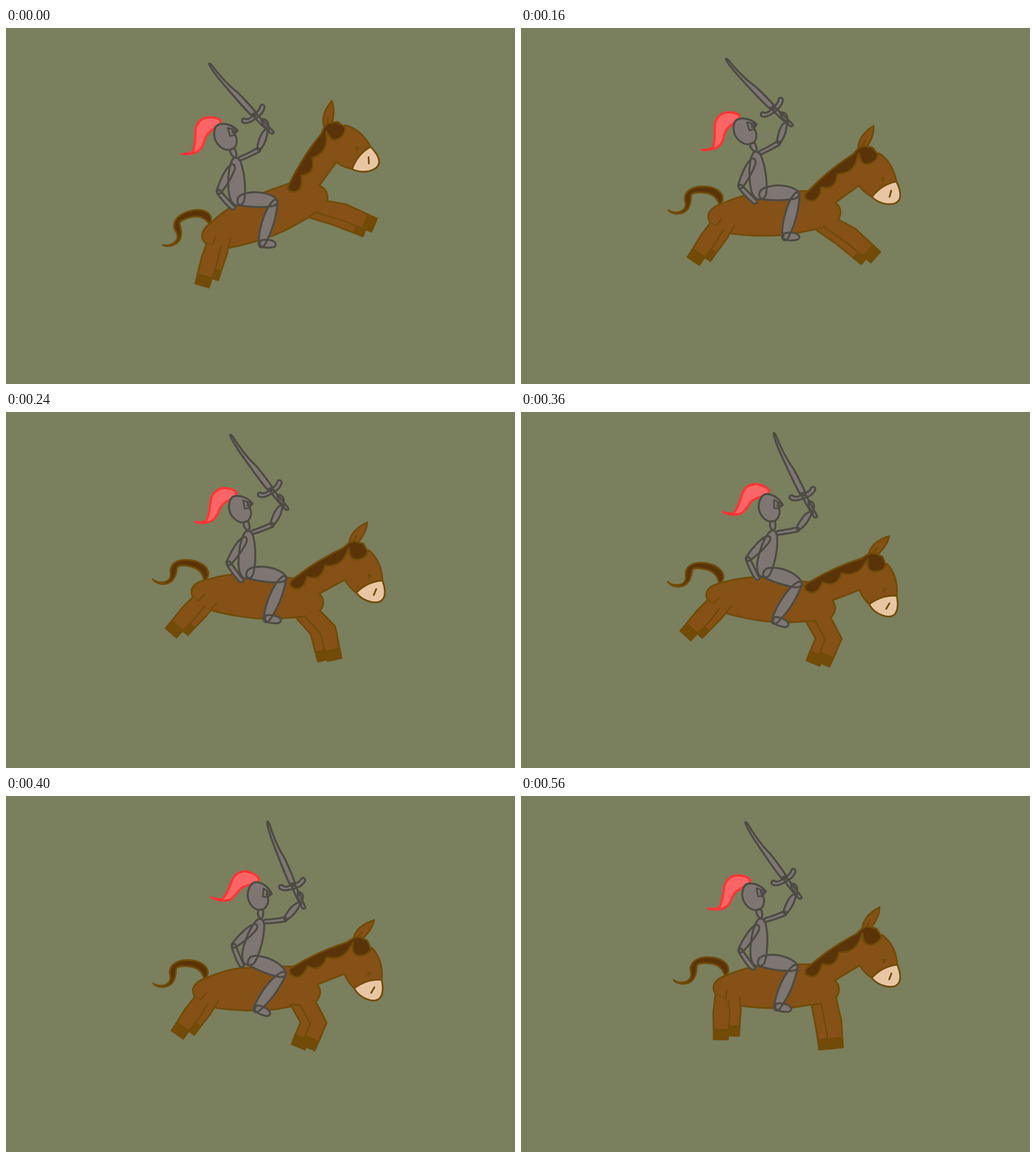
Write an HTML page that moves like this. It is 895 px wide and 626 px high and loops after 640 ms.

```html
<!DOCTYPE html>
<html lang="en">
<head>
<meta charset="utf-8">
<title>Knight on a galloping horse</title>
<style>
  html, body { margin: 0; width: 100%; height: 100%; overflow: hidden; background: #7a7f5e; }
  svg { display: block; width: 100%; height: 100%; }
  path { stroke-linecap: round; stroke-linejoin: round; }
  .horse { fill: #855117; stroke: #714b07; stroke-width: 3; }
  .skin { stroke: none; }
  .line { fill: none; }
  .hoof { fill: #714b07; }
  .hair { fill: #5a3408; }
  .nose { fill: #e9c6a3; }
  .armor { fill: #7e7672; stroke: #4d4b44; stroke-width: 3.5; }
  .plume { fill: #fc6565; stroke: #ff3636; stroke-width: 4; }
</style>
</head>
<body>
<svg viewBox="0 0 895 626">
  <g class="horse">
    <g id="rear">
      <path class="hair" d="M349 311C345 297 336 289 318 289C308 288 301 290 299 293C299 305 297 313 293 318C285 328 268 329 259 320C268 326 282 325 288 316C292 309 287 305 288 297C290 284 304 278 320 278C340 278 355 287 355 300Q354 307 349 311Z"/>
      <path d="M505 286C460 286 440 289 420 290C395 291 372 300 352 309C331 316 324 329 333 342L356 354L370 361C400 365 445 367 480 361L515 354"/>
      <g id="hindFar"></g>
      <g id="hindNear"></g>
    </g>
    <g id="front">
      <path d="M593 212C593 196 604 182 620 172C621 188 614 200 607 212"/>
      <path class="line" d="M600 209L605 197"/>
      <g id="foreFar"></g>
      <path class="skin" d="M499 294Q538 251 585 222L606 208L629 220C645 230 656 247 660 270L617 297L594 277L553 307C563 315 564 326 558 337L533 350L515 354L490 345Z"/>
      <g id="foreNear"></g>
      <path class="line" d="M629 220C645 230 656 247 660 270M617 297Q603 289 594 277L553 307C563 315 564 326 558 337M515 354L533 350M634 264Q638 261 638 265L635 269"/>
      <path class="nose" d="M617 297C628 283 643 273 660 270C667 284 669 294 665 302C658 314 632 312 617 297Z"/>
      <path class="line" d="M651 286L648 297"/>
      <path class="hair" d="M500 292Q538 251 584 222C592 212 598 206 606 208L618 210L628 223C625 236 611 242 602 238C596 234 596 227 594 220C590 230 590 256 556 257C555 272 548 285 528 280C526 296 519 308 505 303Q497 299 500 292Z"/>
    </g>
  </g>
  <g id="knight">
    <path class="plume" d="M377 166C379 160 368 157 358 157C343 157 333 168 333 184C333 199 332 210 328 218Q318 222 309 221Q320 223 329 220C347 216 346 203 352 190C357 181 367 177 374 172Q378 170 377 166Z"/>
    <defs>
      <path id="body" d="M357 63C359 61 364 68 370 76C380 88 392 102 407 113C418 124 430 137 439 148L431 153C420 143 405 125 392 110C378 94 360 72 357 63Z
        M449 162C455 158 462 164 461 172L462 180L452 170Z
        M460 178C452 178 446 190 442 208C440 216 446 217 449 212C456 202 460 190 460 178Z
        M412 226C420 223 432 217 442 211C448 210 449 217 443 219C433 224 422 230 412 233C408 232 408 228 412 226Z
        M436 156L441 152C452 163 462 173 470 182C472 186 467 187 464 184C455 176 446 168 436 156Z
        M419 159C413 160 414 167 419 167C426 168 432 164 438 160C446 155 452 150 454 142C457 135 448 132 447 138C446 144 442 148 436 153C430 158 424 163 419 159Z
        M394 214C400 210 404 213 404 217C407 224 405 228 401 227C396 224 394 220 394 214Z
        M377 169C387 167 400 172 407 180L402 187C408 195 407 210 397 213C385 219 366 205 366 186C366 175 370 170 377 169Z
        M399 230C404 225 412 230 414 240C420 258 422 285 419 303C416 313 408 313 402 311C393 305 391 290 391 275C390 255 394 238 399 230Z
        M396 240C403 238 404 246 401 252C395 266 386 280 378 290C372 294 369 289 371 284C376 268 386 246 396 240Z
        M376 285C383 293 393 304 401 313C405 316 402 320 397 319C388 313 378 300 372 292C370 287 373 284 376 285Z
        M407 305C406 297 413 292 425 290C445 286 470 292 477 303C480 310 470 314 462 314C445 316 425 314 412 312C408 310 407 308 407 305Z
        M470 303C477 300 479 305 477 312C474 340 464 365 455 381C450 389 444 386 444 378C445 352 455 318 470 303Z
        M447 374C453 371 467 372 472 376C477 380 474 386 466 386C458 387 450 385 446 382Z"/>
    </defs>
    <use href="#body" class="armor" style="stroke:none"/>
    <use href="#body" class="armor" style="fill:none"/>
    <path class="armor line" style="stroke-width:3" d="M390 176L394 190L402 188L397 178M391 176L407 180L398 184"/>
  </g>
</svg>
<script>
const $ = id => document.getElementById(id);
const LOOP = 640;

// Motion keys as time: value, joined by straight lines around the loop.
const MOTION = {
  pitch: { 0: -18, 80: -10, 160: 0, 320: 15, 400: 1, 560: 1.5 },
  nod: { 0: 0, 320: 0, 400: 14, 560: 3.5 },
  rearX: { 0: 0, 400: 0, 560: 10 },
  rearY: { 0: 1, 320: 0, 400: 13, 560: 9 },
  frontY: { 0: 0, 400: 0, 560: 9 },
  lean: { 0: 0, 80: -6.9, 160: -2.2, 400: 19.5 },
  seatX: { 0: 0, 80: 8, 320: 20, 400: 19, 560: 10 },
  seatY: { 0: 0, 320: -23, 400: -7, 560: -10 },
  thigh: { 0: 32, 160: 32, 320: 47, 400: 47, 560: 73 },
  shin: { 0: 41, 160: 41, 320: 98, 400: 98, 560: 79 },
  shinLength: { 0: 42, 160: 42, 320: 31, 560: 28 },
  hind: { 0: 124, 400: 124, 560: 90 }
};

function sample(track, t) {
  const keys = [...Object.entries(track).map(([at, v]) => [+at, v]), [LOOP, track[0]]];
  const i = keys.findIndex(([at]) => at > t);
  const [[t0, a], [t1, b]] = [keys[i - 1], keys[i]];
  return a + (b - a) * (t - t0) / (t1 - t0);
}

const rad = deg => deg * Math.PI / 180;
const step = ([x, y], angle, r) => [x + r * Math.cos(rad(angle)), y + r * Math.sin(rad(angle))];
const poly = pts => 'M' + pts.map(p => p.map(v => v.toFixed(1)).join(' ')).join('L');

// A leg is a bent centre line with a front and a back edge; seat is half its top edge.
function leg(id, [x, y], [sx, sy], thigh, thighLength, shin, shinLength) {
  const knee = step([x, y], thigh, thighLength);
  const ankle = step(knee, shin, shinLength);
  const sole = step(ankle, shin, 17);
  const edge = side => [
    [x + side * sx, y + side * sy],
    step(knee, (thigh + shin) / 2 - 90, side * 14.5),
    step(ankle, shin - 90, side * 13),
    step(sole, shin - 90, side * 12.5)
  ];
  const front = edge(1), back = edge(-1);
  $(id).innerHTML =
    `<path d="${poly([...front.slice(0, 3), ...back.slice(0, 3).reverse()])}"/>` +
    `<path class="hoof" d="${poly([...front.slice(2), ...back.slice(2).reverse()])}Z"/>`;
}

function show(t) {
  const m = {};
  for (const name in MOTION) m[name] = sample(MOTION[name], t);
  const place = (id, x, y, turn, pivot) =>
    $(id).setAttribute('transform', `translate(${x} ${y}) rotate(${turn} ${pivot})`);
  place('rear', m.rearX, m.rearY, m.pitch, '458 299');
  place('front', 0, m.frontY, m.pitch + m.nod, '458 299');
  place('knight', m.seatX, m.seatY, m.lean, '430 300');

  const fore = (id, hip) => leg(id, hip, [12.5, -6.5], m.thigh, 40, m.shin, m.shinLength);
  const hind = (id, hip) => leg(id, hip, [11.5, 6], m.hind, 28, m.hind, 29);
  fore('foreFar', [528, 346]);
  fore('foreNear', [545, 343]);
  hind('hindFar', [364, 341]);
  hind('hindNear', [344.5, 348]);
}

// The picture holds for 80 ms, but changes twice as fast during the landing.
let shown;
function tick() {
  const t = performance.now() % LOOP;
  const hold = t >= 320 && t < 400 ? 40 : 80;
  const now = Math.floor(t / hold) * hold;
  if (now !== shown) show(shown = now);
  requestAnimationFrame(tick);
}
tick();
</script>
</body>
</html>
```
